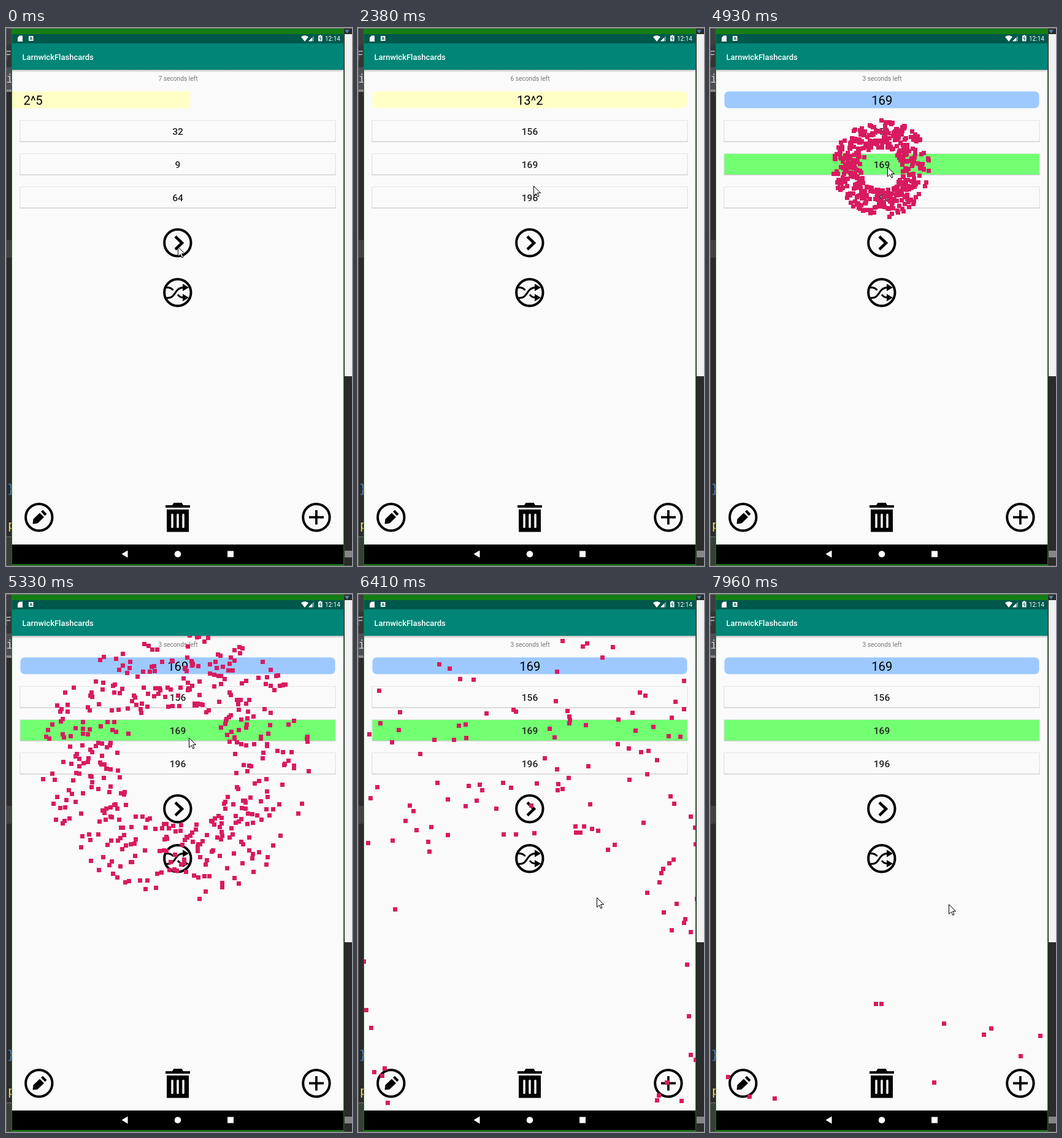
Animation, 564 px wide and 876 px high, one loop 8 s. Source, as an HTML page:

```html
<!DOCTYPE html>
<html lang="en">
<head>
<meta charset="utf-8">
<title>Flashcards</title>
<style>
html, body { margin: 0; width: 100%; height: 100%; overflow: hidden; background: #2b2b2b; }
svg { display: block; width: 564px; height: 876px; font-family: Roboto, sans-serif; }
.mid { text-anchor: middle; }
.answer { font-size: 15.5px; font-weight: 500; fill: #212121; }
.code { font: 20px "DejaVu Sans Mono", monospace; }
.line { fill: none; stroke: #000; stroke-width: 4; }
</style>
</head>
<body>
<svg viewBox="0 0 564 876">
  <defs>
    <clipPath id="content"><rect x="10" y="68" width="540" height="773"/></clipPath>
    <clipPath id="edge"><rect width="9" height="876"/></clipPath>
    <linearGradient id="shade" x2="0" y2="1">
      <stop stop-color="#000" stop-opacity=".25"/><stop offset="1" stop-color="#000" stop-opacity="0"/>
    </linearGradient>
  </defs>

  <!-- editor behind the emulator -->
  <rect width="564" height="876" fill="#2b2b2b"/>
  <g clip-path="url(#edge)">
    <rect width="10" height="64" fill="#3c3f41"/>
    <rect y="28" width="10" height="36" fill="#333537"/>
    <rect y="64" width="10" height="36" fill="#4b4f51"/>
    <rect y="100" width="10" height="4" fill="#85888a"/>
    <rect y="345" width="10" height="29" fill="#414243"/>
    <rect y="829" width="10" height="47" fill="#364135"/>
    <path d="M0 828.5H10" stroke="#777"/>
    <g class="code">
      <text x="-3" y="51" fill="#a9b7c6">F</text>
      <text x="0" y="89" fill="#c5c8ca">i</text>
      <text x="2" y="757" fill="#4f86b8">}</text>
      <text x="3" y="816" fill="#e8d44d">p</text>
    </g>
    <path d="M.5 0V876" stroke="#6a6a6a"/>
  </g>
  <rect x="552" y="10" width="12" height="557" fill="#f1f1f1"/>
  <rect x="552" y="851" width="12" height="11" fill="#858585"/>
  <path d="M552 3H560L556 9Z" fill="#4a7fae"/>
  <rect x="9" y="0" width="542" height="876" fill="#147d14"/>
  <path d="M0 .5H564" stroke="#777"/>
  <path d="M0 875.5H564" stroke="#555"/>

  <!-- app -->
  <rect x="10" y="68" width="540" height="773" fill="#fafafa"/>
  <rect x="10" y="10" width="540" height="15" fill="#00574b"/>
  <rect x="10" y="25" width="540" height="43" fill="#008577"/>
  <rect x="10" y="68" width="540" height="4" fill="url(#shade)"/>
  <g fill="#fff">
    <path d="M22 12.5H27V22H19V15.5Z"/>
    <rect x="37" y="13" width="7.5" height="8"/>
    <path d="M481 14.5Q487 10 493 14.5L487 22Z"/>
    <path d="M502 12.5V21.5H493Z" opacity=".4"/>
    <path d="M499 15.5V21.5H493Z"/>
    <path d="M509 12.5H511V11.5H513.5V12.5H515.5V21.5H509Z"/>
    <text x="520" y="20.5" font-size="10">12:14</text>
    <text x="26.5" y="52" font-size="13" font-weight="500">LarnwickFlashcards</text>
  </g>
  <path d="M39 19.5L40.8 14.5L42.6 19.5M39.5 18H42" fill="none" stroke="#00574b"/>
  <path d="M512.8 13.5L511 17H513.5L511.8 20.5" fill="none" stroke="#00574b"/>

  <text id="timer" class="mid" x="280.500" y="86" font-size="10.200" fill="#757575"></text>
  <g clip-path="url(#content)">
    <g id="card">
      <rect id="face" x="23.500" y="103.200" width="513" height="27.400"/>
      <text id="question" class="mid" x="280.300" y="124.800" font-size="20.300"></text>
    </g>
  </g>
  <g id="answers"></g>

  <g class="line">
    <circle cx="279.800" cy="349.800" r="21.700"/>
    <path d="M276 339.500L287 350L276 360.500" stroke-width="4.500"/>
    <circle cx="279.800" cy="430.800" r="21.700"/>
    <path d="M261 422.500Q269 422 272.500 427M262 439.500C278 441 273 422.500 290 422.500M280 434Q283 439 290 439" stroke-width="3"/>
    <circle cx="53.800" cy="796.800" r="21.700"/>
    <circle cx="505.900" cy="796.800" r="21.700"/>
    <path d="M494 796.600H518M505.900 785V808.500" stroke-width="3.700"/>
  </g>
  <path d="M288 416.500L298 422.500L288 428.500ZM288 433L298 439L288 445Z"/>
  <path d="M43.500 807.500L44.500 799.500L55 789.500L62 796.500L51.500 806.500ZM57 787.500L60 784.800L66.500 791.300L63.500 794.300Z"/>
  <path d="M260 777H271L273.500 773H286.500L289 777H300V781H260ZM262 784H298V820.500H262Z"/>
  <path d="M271 792.500V812.500M280 792.500V812.500M289 792.500V812.500" stroke="#fafafa" stroke-width="3.500" stroke-linecap="round"/>

  <path id="confetti" fill="#d81b60" clip-path="url(#content)"/>

  <rect x="10" y="841" width="540" height="32" fill="#000"/>
  <g fill="#fff">
    <path d="M188.500 856.500L198.500 850.500V862.500Z"/>
    <circle cx="280" cy="856.500" r="5.300"/>
    <rect x="361" y="851.500" width="10" height="10"/>
  </g>
  <path id="cursor" d="M.5 .5V16L4.300 12.500L6.800 18L9 17L6.600 11.500H11.500Z" fill="#fff" stroke="#000"/>
</svg>

<script>
const LOOP = 8000;
const SLIDE = 700;
const ANSWERED = 4700;
const $ = id => document.getElementById(id);

// Spans in which the screen is alive; between them it stands still.
const spans = [[70, 380], [630, 1330], [1750, 2380], [2690, 3400], [3580, 3640],
  [4190, 5740], [5870, 6130], [6290, 7040], [7130, 7960]];

// Pointer stops: time, x, y
const stops = [[0, 280, 356], [750, 280, 356], [1120, 386, 551], [1330, 448, 717],
  [1750, 448, 717], [2380, 286, 257], [2690, 286, 257], [3020, 398, 284],
  [3400, 328, 231], [3580, 328, 231], [3640, 326, 234], [4190, 326, 234],
  [4560, 289, 226], [4990, 289, 226], [5330, 298, 233], [5740, 389, 480],
  [6410, 389, 494], [7040, 389, 505]];

const ease = x => (1 - Math.cos(Math.PI * Math.min(1, Math.max(0, x)))) / 2;

function heldTime(t) {
  let held = 0;
  for (const [from, to] of spans) if (t >= from) held = Math.min(t, to);
  return held;
}

function pointerAt(t) {
  const next = stops.findIndex(s => s[0] > t);
  if (next < 0) return stops[stops.length - 1].slice(1);
  const [t0, x0, y0] = stops[next - 1], [t1, x1, y1] = stops[next];
  const k = (t - t0) / (t1 - t0);
  return [x0 + (x1 - x0) * k, y0 + (y1 - y0) * k];
}

let seed = 20;
function random() {
  seed = (Math.imul(seed, 1664525) + 1013904223) >>> 0;
  return seed / 4294967296;
}
const particles = Array.from({ length: 460 }, () => {
  const angle = random() * 2 * Math.PI, speed = 0.15 + random() * 0.205;
  return { vx: speed * Math.cos(angle), vy: speed * Math.sin(angle) };
});

function confettiPath(age) {
  if (age <= 0) return "";
  const fall = 0.00015 * age * age;
  return particles.map(({ vx, vy }) => {
    const x = Math.round(276.5 + vx * age), y = Math.round(218.5 + vy * age + fall);
    return y < 845 && x > 0 && x < 552 ? `M${x} ${y}h7v7h-7z` : "";
  }).join("");
}

$("answers").innerHTML = [151, 205, 259].map(y => `
  <rect x="22" y="${y - 1}" width="516" height="36" rx="1.5" fill="#e6e6e6"/>
  <rect x="23" y="${y + 32}" width="514" height="2.5" fill="#c9c9c9"/>
  <rect class="button" x="23.5" y="${y}" width="513" height="33.5" fill="#fafafa"/>
  <text class="mid answer" x="280" y="${y + 23}"></text>`).join("");
const buttons = document.querySelectorAll(".button");
const labels = document.querySelectorAll(".answer");

function cardShift(t) {
  if (t < 380) return -540 * ease(0.46 + t / SLIDE);
  return 540 * (1 - ease((t - 608) / SLIDE));
}

function secondsLeft(t) {
  return 7 - [1750, 2690, 3640, 4640].filter(tick => t >= tick).length;
}

function render(time) {
  const t = heldTime(time);
  const second = t >= 630, answered = t >= ANSWERED;

  $("timer").textContent = `${secondsLeft(t)} seconds left`;
  $("question").textContent = answered ? "169" : second ? "13^2" : "2^5";
  $("face").setAttribute("fill", answered ? "#9dc9ff" : "#ffffc6");
  $("face").setAttribute("rx", second ? 7 : 0);
  $("card").setAttribute("transform", `translate(${cardShift(t)})`);
  $("card").setAttribute("visibility", t >= 380 && !second ? "hidden" : "visible");

  const values = second ? [156, 169, 196] : [32, 9, 64];
  labels.forEach((label, i) => label.textContent = values[i]);
  buttons[1].setAttribute("fill", answered ? "#72ff72" : "#fafafa");

  $("confetti").setAttribute("d", confettiPath(t - 4707));
  const [x, y] = pointerAt(t).map(Math.round);
  $("cursor").setAttribute("transform", `translate(${x} ${y})`);
}

const start = performance.now();
function tick() {
  render((performance.now() - start) % LOOP);
  requestAnimationFrame(tick);
}
tick();
</script>
</body>
</html>
```
